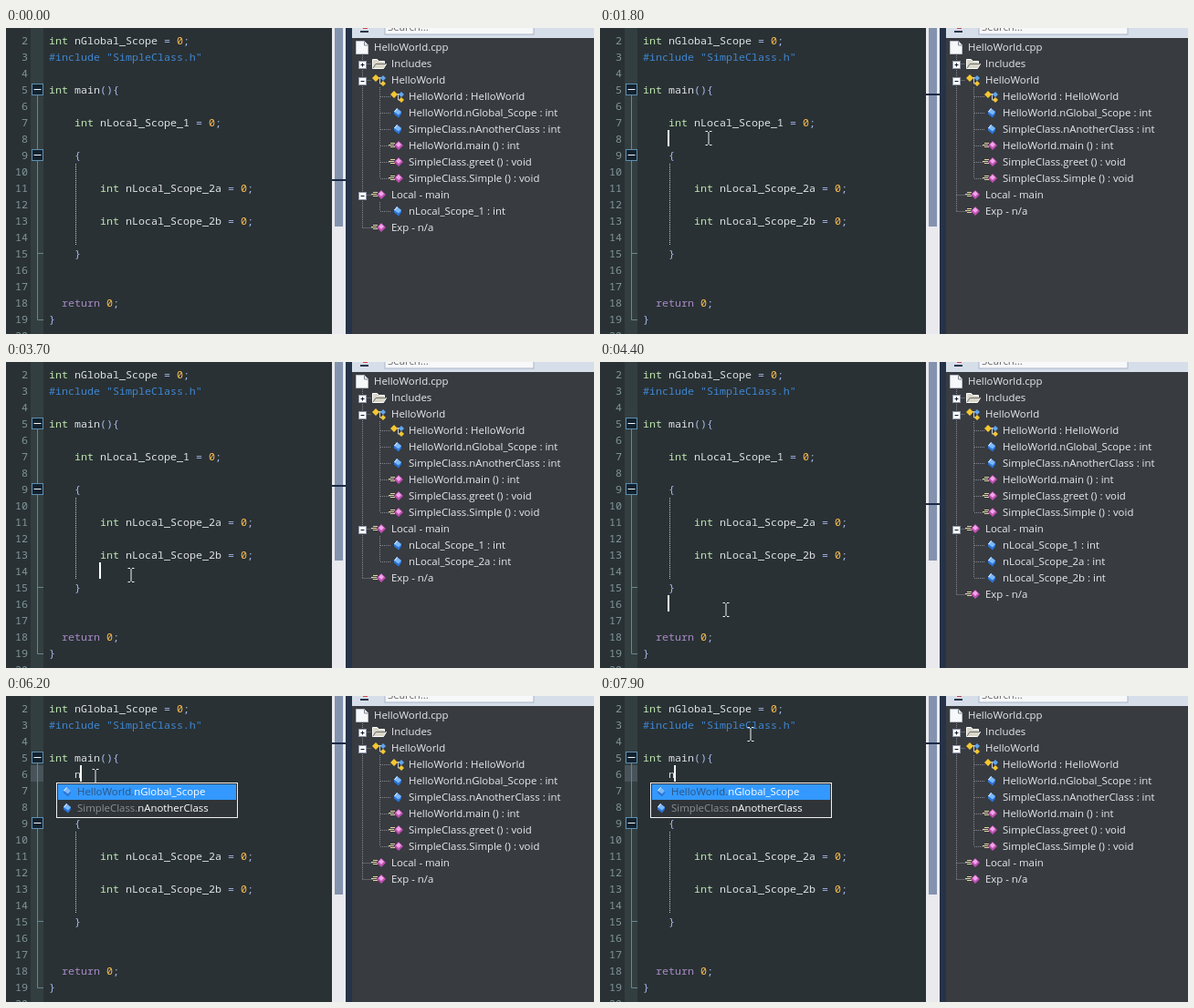
An HTML page that plays this animation: 644 px wide and 336 px high, repeating every 8 s.

```html
<!DOCTYPE html>
<html lang="en">
<head>
<meta charset="utf-8">
<title>Scope outline</title>
<style>
  html, body { margin: 0; width: 100%; height: 100%; overflow: hidden; background: #293134; }
  svg { display: block; width: 644px; height: 336px; }
  text { white-space: pre; }
  .code { font: 11.667px "Noto Sans Mono", "DejaVu Sans Mono", monospace; fill: #e0e2e4; }
  .ui { font: 11.4px "Open Sans", "Noto Sans", sans-serif; fill: #e8eaed; }
  .key { fill: #bfe6b0; }
  .num { fill: #ffbe4d; }
  .pre { fill: #3f86d2; }
  .ret { fill: #a98bc6; }
  .op { fill: #a9b9ee; }
  .dots { stroke: #85898f; stroke-dasharray: 1 1; fill: none; }
</style>
</head>
<body>
<svg id="stage" viewBox="0 0 644 336"></svg>
<script>
const LOOP = 8000, STEP = 100;
const stage = document.getElementById('stage');

function add(parent, tag, attrs = {}, text) {
  const node = document.createElementNS('http://www.w3.org/2000/svg', tag);
  for (const name in attrs) node.setAttribute(name, attrs[name]);
  if (text !== undefined) node.textContent = text;
  parent.appendChild(node);
  return node;
}
const group = (parent, x = 0, y = 0) => add(parent, 'g', { transform: `translate(${x} ${y})` });
const rect = (parent, x, y, width, height, fill, extra) =>
  add(parent, 'rect', { x, y, width, height, fill, ...extra });
const path = (parent, d, extra) => add(parent, 'path', { d, fill: 'none', ...extra });
const label = (parent, x, y, text) => add(parent, 'text', { x, y: y + 4, class: 'ui' }, text);
const show = (node, on) => node.setAttribute('visibility', on ? 'visible' : 'hidden');
const lineTop = n => 4 + (n - 2) * 18;

// Each piece is [text, class]; the first column is 47 px from the left.
function codeLine(parent, n, col, pieces) {
  const line = add(parent, 'text', { x: 47 + 7 * col, y: lineTop(n) + 14, class: 'code' });
  for (const [text, cls = ''] of pieces) add(line, 'tspan', { class: cls }, text);
  return line;
}
const declare = name =>
  [['int', 'key'], [` ${name} `], ['= ', 'op'], ['0', 'num'], [';', 'op']];

function signBox(parent, x, y, size, colors, plus) {
  const half = size / 2, arm = half - 2;
  rect(parent, x - half, y - half, size, size, colors.fill, { stroke: colors.edge });
  path(parent, `M${x - arm} ${y}h${2 * arm}` + (plus ? `M${x} ${y - arm}v${2 * arm}` : ''),
    { stroke: colors.sign });
}
const foldColors = { fill: '#14222e', edge: '#5f8fae', sign: '#f0f5f8' };
const treeColors = { fill: '#ffffff', edge: '#8f98a8', sign: '#101828' };

const icons = {
  field(p, x, y) {
    path(p, `M${x - 4} ${y - 1}l3 -4l5 4v2.5l-3 4l-5 -4z`, { fill: '#2a74d8' });
    path(p, `M${x - 4} ${y - 1}l3 -4l5 4l-3 3.5z`, { fill: '#7db8f6' });
    path(p, `M${x - 3.5} ${y - 1}l3 -3.5`, { stroke: '#eef6ff' });
  },
  method(p, x, y) {
    path(p, `M${x - 8} ${y - 2.5}h5M${x - 10} ${y - .5}h6M${x - 8} ${y + 1.5}h5`, { stroke: '#e3d7a4' });
    path(p, `M${x + 1} ${y - 5}l5 5l-5 5l-5 -5z`, { fill: '#c04fb4' });
    path(p, `M${x + 1} ${y - 4}l3 3l-3 3l-3 -3z`, { fill: '#f2a5e8' });
  },
  type(p, x, y) {
    path(p, `M${x - 1} ${y - 2.5}h5M${x + .5} ${y - 2}v6h3`, { stroke: '#c9ced6' });
    path(p, `M${x - 4} ${y - 6}l4 4l-4 4l-4 -4z`, { fill: '#f3c631' });
    path(p, `M${x + 4} ${y - 5}l3 3l-3 3l-3 -3z`, { fill: '#5fa6f0' });
    path(p, `M${x + 4} ${y + 1}l3 3l-3 3l-3 -3z`, { fill: '#f3c631' });
  },
  folder(p, x, y) {
    path(p, `M${x - 7.5} ${y + 5.5}v-10h5l2 2h6v3h2l-3 5z`, { fill: '#d9d6c8', stroke: '#ffffff' });
    path(p, `M${x - 7} ${y + 5}l3 -4.5h11`, { stroke: '#6d6f70' });
  },
  page(p, x, y) {
    path(p, `M${x - 6.5} ${y - 6.5}h9l4 4v10h-13z`, { fill: '#f7f8fa', stroke: '#b9bfc8' });
    path(p, `M${x + 2.5} ${y - 6}v4h4`, { stroke: '#7f8792' });
  }
};

/* Editor */
rect(stage, 0, 0, 358, 336, '#293134');
rect(stage, 27, 0, 14, 336, '#333e41');
const changed = rect(stage, 27, 76, 14, 18, '#48535a');
for (let n = 2; n <= 20; n++)
  add(stage, 'text', { x: 24, y: lineTop(n) + 14, 'text-anchor': 'end', class: 'code', style: 'fill:#81969a' }, n);

path(stage, 'M34.5 74V320.5H41M34.5 247.5H41', { stroke: '#678790' });
signBox(stage, 34.5, 67.5, 12, foldColors);
signBox(stage, 34.5, 139.5, 12, foldColors);
path(stage, 'M76.5 149V239', { stroke: '#c3cacc', 'stroke-dasharray': '1 1' });

codeLine(stage, 2, 0, declare('nGlobal_Scope'));
codeLine(stage, 3, 0, [['#include "SimpleClass.h"', 'pre']]);
codeLine(stage, 5, 0, [['int', 'key'], [' main'], ['(){', 'op']]);
const typed = codeLine(stage, 6, 4, [['n']]);
const covered = codeLine(stage, 7, 4, declare('nLocal_Scope_1'));
codeLine(stage, 9, 4, [['{', 'op']]);
codeLine(stage, 11, 8, declare('nLocal_Scope_2a'));
codeLine(stage, 13, 8, declare('nLocal_Scope_2b'));
codeLine(stage, 15, 4, [['}', 'op']]);
codeLine(stage, 18, 2, [['return ', 'ret'], ['0', 'num'], [';', 'op']]);
codeLine(stage, 19, 0, [['}', 'op']]);

/* Scroll bar and sash */
rect(stage, 357, 0, 15, 336, '#e9e9ee');
rect(stage, 360, 0, 9, 218, '#8393ae');
rect(stage, 372, 0, 7, 336, '#253247');
const marker = rect(stage, 357, 0, 15, 2, '#1b2a44');

/* Outline */
rect(stage, 379, 0, 265, 336, '#383b40');
rect(stage, 379, 0, 265, 11, '#d6deea');
path(stage, 'M388 4h9', { stroke: '#2b3648', 'stroke-width': 2 });
rect(stage, 391, 0, 5, 1, '#c9444d');
rect(stage, 415, -1, 163, 8, '#f7f8fa', { stroke: '#a9b4c6' });
add(stage, 'text', { x: 418, y: 3, class: 'ui', style: 'fill:#666' }, 'Search...');

path(stage, 'M409.5 65V165M390.5 39.5H400M390.5 57.5H400', { class: 'dots' });
icons.page(stage, 390, 21);
label(stage, 403, 21, 'HelloWorld.cpp');
icons.folder(stage, 409, 39);
label(stage, 422, 39, 'Includes');
icons.type(stage, 409, 57);
label(stage, 422, 57, 'HelloWorld');

function child(parent, kind, y, text) {
  path(parent, `M410 ${y + .5}H421`, { class: 'dots' });
  icons[kind](parent, 429, y);
  label(parent, 441, y, text);
}
[
  ['type', 'HelloWorld : HelloWorld'],
  ['field', 'HelloWorld.nGlobal_Scope : int'],
  ['field', 'SimpleClass.nAnotherClass : int'],
  ['method', 'HelloWorld.main () : int'],
  ['method', 'SimpleClass.greet () : void'],
  ['method', 'SimpleClass.Simple () : void']
].forEach(([kind, text], i) => child(stage, kind, 75 + 18 * i, text));

function scopeRow(parent, y, text) {
  path(parent, `M390.5 ${y + .5}H402`, { class: 'dots' });
  icons.method(parent, 410, y);
  label(parent, 422, y, text);
}
function scopeTree(name, locals) {
  const g = group(stage), end = 201 + 18 * locals.length;
  path(g, `M390.5 30V${end}`, { class: 'dots' });
  scopeRow(g, 183, `Local - ${name}`);
  scopeRow(g, end, 'Exp - n/a');
  if (locals.length) {
    path(g, `M409.5 191V${end - 18}`, { class: 'dots' });
    signBox(g, 390.5, 184.5, 8, treeColors);
  }
  locals.forEach((v, i) => child(g, 'field', 201 + 18 * i, `nLocal_Scope_${v} : int`));
  return g;
}
const trees = [
  scopeTree('n/a', []),
  scopeTree('main', []),
  scopeTree('main', ['1']),
  scopeTree('main', ['1', '2a']),
  scopeTree('main', ['1', '2a', '2b'])
];
signBox(stage, 390.5, 40.5, 8, treeColors, true);
signBox(stage, 390.5, 58.5, 8, treeColors);

/* Completion list */
const popup = group(stage, 1, 0);
rect(popup, 54.5, 95.5, 198, 38, '#2f3438', { stroke: '#f0f0f0' });
rect(popup, 56, 97, 195, 17, '#3399ff');
function proposal(y, owner, name, ownerColor) {
  icons.field(popup, 66, y);
  const t = label(popup, 77, y, '');
  add(t, 'tspan', { fill: ownerColor }, owner + '.');
  add(t, 'tspan', { fill: '#ffffff' }, name);
}
proposal(105, 'HelloWorld', 'nGlobal_Scope', '#2c5580');
proposal(123, 'SimpleClass', 'nAnotherClass', '#8b9092');

/* Caret and pointers */
const caret = rect(stage, 0, 0, 2, 18, '#ffffff');
const beam = group(stage);
path(beam, 'M-3 -7.5h2.5M1.5 -7.5h2.5M-3 7.5h2.5M1.5 7.5h2.5M.5 -7v14', { stroke: '#f1f3f4' });
const arrow = group(stage);
path(arrow, 'M.5 .5v16l3.7 -3.6l2.5 5.6l2.4 -1l-2.5 -5.5h4.9z', { fill: '#fff', stroke: '#000' });

/* Timeline */
// [time, line, column]
const clicks = [[0, 17, 4], [300, 2, 0], [800, 4, 0], [1200, 6, 4], [1700, 8, 4], [2500, 10, 8],
  [3000, 12, 8], [3600, 14, 8], [4400, 16, 4], [5800, 6, 4], [6200, 6, 5]];
// [time, tree]
const scopes = [[0, 2], [500, 0], [1500, 1], [1900, 2], [3300, 3], [3900, 4], [4700, 2], [5900, 1]];
// [time, x, y]
const moves = [[200, 92, 16], [400, 94, 18], [800, 98, 50], [1000, 100, 56], [1300, 108, 88],
  [1700, 119, 121], [1900, 119, 121], [2300, 128, 156], [2500, 128, 158], [2800, 136, 186],
  [3000, 137, 194], [3300, 137, 204], [3600, 137, 234], [3800, 137, 234], [4200, 138, 272],
  [4400, 138, 272], [5000, 98, 88], [6500, 98, 88], [6900, 157, 117], [7000, 157, 117],
  [7400, 178, 124], [7500, 178, 124], [7900, 165, 42]];

const latest = (table, t) => table.filter(row => row[0] <= t).pop() || table[0];

function pointerAt(t) {
  const from = latest(moves, t), to = moves[moves.indexOf(from) + 1] || from;
  const k = Math.min(1, Math.max(0, (t - from[0]) / (to[0] - from[0] || 1)));
  const ease = k * k * (3 - 2 * k);
  return [1, 2].map(i => Math.round(from[i] + (to[i] - from[i]) * ease));
}

// A click lights the caret; a free-running 530 ms clock flips it.
const ticks = t => Math.floor((t - 390) / 530);
const caretLit = (t, clicked) => clicked > 0 && (ticks(t) - ticks(clicked)) % 2 === 0;

function draw(time) {
  const t = Math.floor(time % LOOP / STEP) * STEP;
  const [clicked, line, col] = latest(clicks, t);
  caret.setAttribute('x', 46 + 7 * col);
  caret.setAttribute('y', lineTop(line));
  show(caret, caretLit(t, clicked));
  marker.setAttribute('y', Math.round(10.4 * line - 11));

  const scope = latest(scopes, t)[1];
  trees.forEach((tree, i) => show(tree, i === scope));
  const typing = t >= 6200;
  [popup, typed, changed].forEach(node => show(node, typing));
  show(covered, !typing);

  const [x, y] = pointerAt(t);
  const inList = typing && x > 54 && x < 253 && y > 95 && y < 134;
  for (const node of [beam, arrow]) node.setAttribute('transform', `translate(${x - .5} ${y})`);
  show(beam, t >= 200 && !inList);
  show(arrow, inList);
}

const start = performance.now();
function frame() {
  draw(performance.now() - start);
  requestAnimationFrame(frame);
}
frame();
</script>
</body>
</html>
```
